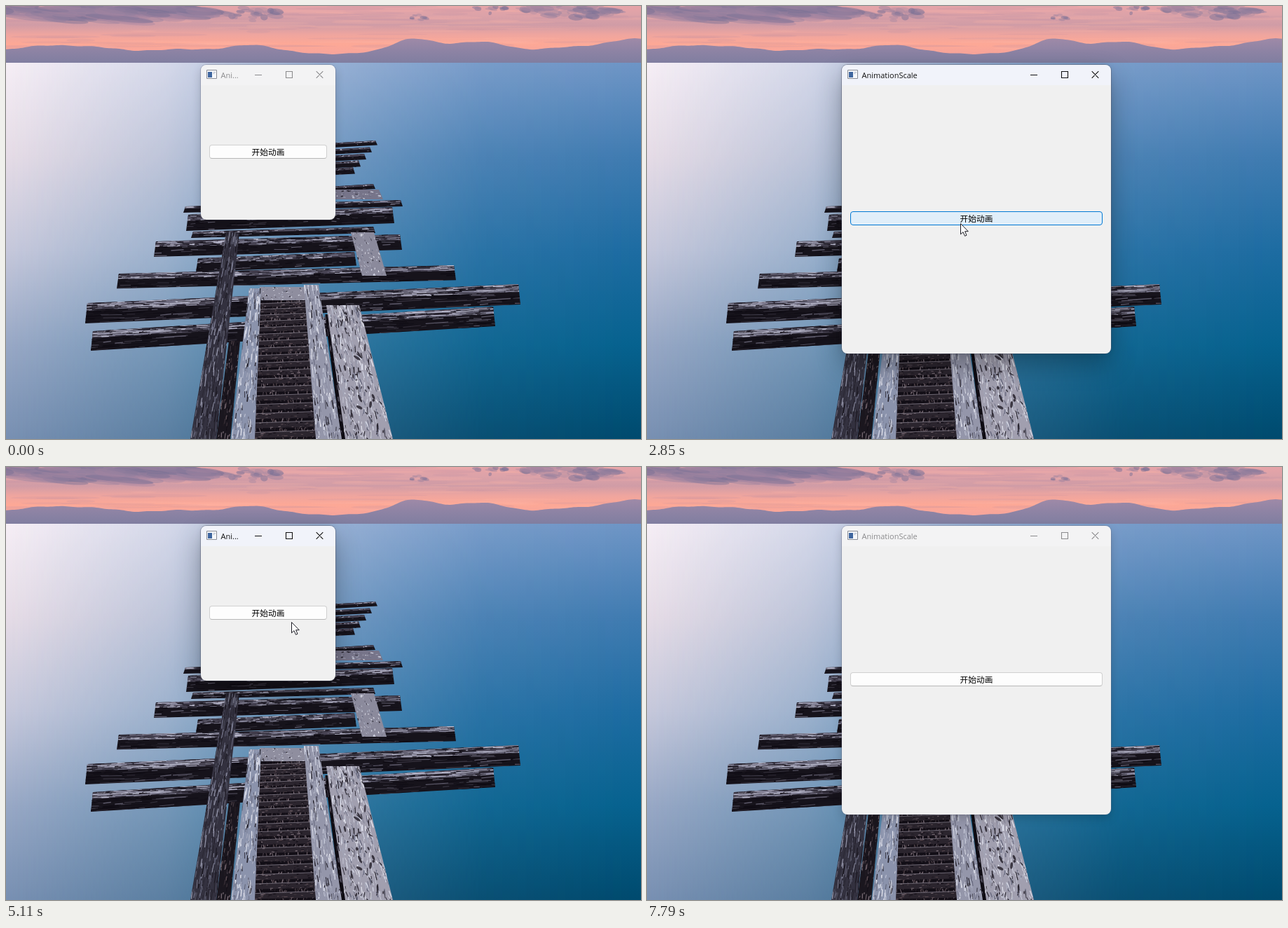
An HTML page with a canvas for the animation above (7860 ms loop, 906 by 618 pixels).

```html
<!DOCTYPE html>
<html lang="zh">
<head>
<meta charset="utf-8">
<title>AnimationScale</title>
<style>
  html, body { margin: 0; width: 100%; height: 100%; overflow: hidden; }
  body { position: relative; background: #3f78b0; }
  canvas { position: absolute; left: 0; top: 0; }
  #win {
    position: absolute; left: 278px; top: 84px; border-radius: 8px; overflow: hidden;
    background: rgba(255,255,255,.15);
    box-shadow: 0 0 0 1px rgba(90,95,115,.3), 0 5px 14px rgba(0,0,0,.18);
  }
  #win.active { box-shadow: 0 0 0 1px rgba(70,75,95,.4), 0 16px 36px rgba(0,0,0,.3), 0 0 10px rgba(0,0,0,.08); }
  #bar { position: absolute; left: 0; right: 0; top: 0; height: 29px; background: #f3f3f4; color: #8b8b8d; }
  .active #bar { background: #f1f3fa; color: #111; }
  #icon { position: absolute; left: 8px; top: 7px; }
  #title {
    position: absolute; left: 28.5px; top: 6px; white-space: nowrap;
    font: 11px/17px "Open Sans", "Noto Sans", sans-serif;
  }
  #ctl { position: absolute; right: 0; top: 0; fill: none; stroke: currentColor; stroke-width: 1.1; }
  #client { position: absolute; left: 0; top: 29px; background: #f0f0f0; }
  #btn {
    position: absolute; left: 12px; right: 12px; height: 20px; box-sizing: border-box;
    border: 1px solid #d0d0d0; border-bottom-color: #b8b8b8; border-radius: 4px; background: #fdfdfd;
    color: #000; text-align: center; white-space: nowrap;
    font: 11.7px/18px "Noto Sans CJK SC", "Noto Sans CJK", sans-serif;
  }
  #btn.hover { background: #e0eef9; border-color: #0078d4; }
  #btn.down { background: #cce4f7; border-color: #005499; }
  #cur { position: absolute; left: 0; top: 0; overflow: visible; }
</style>
</head>
<body>
<canvas id="bg" width="906" height="618"></canvas>
<div id="win">
  <div id="client"><div id="btn">开始动画</div></div>
  <div id="bar">
    <svg id="icon" width="15" height="13">
      <path d="M.5 .5h14v12H.5z" fill="#f7f8fb" stroke="#8a8d96"/>
      <path d="M2 3h6v8H2z" fill="#3f669f"/>
      <path d="M9.5 3.5h3.5M9.5 5.5h2" stroke="#a9b4c8"/>
    </svg>
    <span id="title"></span>
    <svg id="ctl" width="132" height="29">
      <path d="M17 14.5h10M61.5 9.5h9v9h-9zM104.7 9.2l9.6 9.6m0-9.6l-9.6 9.6"/>
    </svg>
  </div>
</div>
<svg id="cur" width="12" height="20">
  <path d="M.5.6V15.8L4 12.6 6.5 18.3 9 17.2 6.6 11.7H11.3Z" fill="#fff" stroke="#1c1c24" stroke-linejoin="round"/>
</svg>
<script>
const $ = id => document.getElementById(id);
const W = 906, H = 618, SHORE = 81;
const bg = $('bg').getContext('2d');
let seed = 71;
const rnd = (a = 0, b = 1) => {
  seed = (seed * 16807) % 2147483647;
  return a + (b - a) * seed / 2147483647;
};
const pick = list => list[Math.floor(rnd(0, list.length))];
const mix = (a, b, k) => a + (b - a) * k;

function shade(c, x0, y0, x1, y1, colors) {
  const gr = c.createLinearGradient(x0, y0, x1, y1);
  colors.forEach((v, i) => gr.addColorStop(i / (colors.length - 1), v));
  c.fillStyle = gr;
}
function blob(x, y, rx, ry, color, turn = 0) {
  bg.fillStyle = color;
  bg.beginPath();
  bg.ellipse(x, y, rx, ry, turn, 0, 7);
  bg.fill();
}

function cloud(x, y, w, h) {
  for (let i = 0; i < w / 3; i++) {
    const dx = rnd(-1, 1), r = 1 - dx * dx;
    blob(x + dx * w / 2, y + rnd(-.5, .5) * h * r, rnd(.05, .16) * w, rnd(.08, .2) * h,
      pick(['rgba(124,114,149,.5)', 'rgba(146,126,158,.45)', 'rgba(166,134,160,.4)']), .1);
  }
}

function sky() {
  shade(bg, 0, 0, 0, SHORE, ['#e6a4a8', '#dca2a8', '#d09ca6', '#eea59f', '#fda896', '#f7a59b', '#e9a3a2']);
  bg.fillRect(0, 0, W, SHORE + 1);
  for (let i = 0; i < 110; i++)
    blob(rnd(0, W), rnd(0, 62), rnd(15, 80), rnd(.5, 2.5),
      pick(['rgba(255,182,164,.2)', 'rgba(178,138,160,.17)']));
  cloud(130, 7, 330, 32);
  cloud(355, 12, 75, 24);
  cloud(588, 16, 34, 12);
  cloud(690, 3, 45, 16);
  cloud(805, 6, 130, 24);

  // ridge: a few broad peaks with a small ripple
  const peaks = [[80, 12, 100], [265, 6, 60], [355, 12, 45], [578, 20, 42], [672, 17, 60], [800, 7, 60], [906, 21, 70]];
  bg.beginPath();
  bg.moveTo(0, SHORE);
  for (let x = 0; x <= W; x += 3) {
    const up = peaks.reduce((s, [c, h, w]) => s + h * Math.exp(-(((x - c) / w) ** 2)), 0);
    bg.lineTo(x, 68 - up + Math.sin(x / 9) * Math.sin(x / 23));
  }
  bg.lineTo(W, SHORE);
  shade(bg, 0, 48, 0, SHORE, ['#9d89a7', '#8d83a4', '#807ea0']);
  bg.fill();
}

// the deep right side, with the pale left side fading over it
function water() {
  const layer = document.createElement('canvas');
  layer.width = W;
  layer.height = H;
  const c = layer.getContext('2d');
  shade(bg, 0, SHORE, 0, H, ['#6e95c6', '#3f7bb1', '#1d6ca2', '#06628f', '#004a6e']);
  bg.fillRect(0, SHORE, W, H);
  shade(c, 0, SHORE, 0, H, ['#f6eef5', '#e6dce6', '#c6c8db', '#98a8c5', '#7890b2']);
  c.fillRect(0, SHORE, W, H);
  c.globalCompositeOperation = 'destination-in';
  shade(c, 0, 0, W, 0, [1, .76, .32, .08, 0].map(a => `rgba(0,0,0,${a})`));
  c.fillRect(0, 0, W, H);
  bg.drawImage(layer, 0, 0);
}

// corners run start, end, far end, far start; the grain follows start to end
function plank(q, base, tones, n, top = 0) {
  const at = (u, v) => [0, 1].map(i => mix(mix(q[0][i], q[1][i], u), mix(q[3][i], q[2][i], u), v));
  const quad = pts => {
    bg.beginPath();
    pts.forEach(p => bg.lineTo(...p));
    bg.closePath();
  };
  bg.save();
  quad(q);
  bg.fillStyle = base;
  bg.fill();
  bg.clip();
  if (top) {
    quad([at(0, 0), at(1, 0), at(1, top), at(0, top)]);
    bg.fillStyle = '#474353';
    bg.fill();
  }
  for (let i = 0; i < n; i++) {
    const u = rnd(-.05, 1), lit = rnd() < top * 1.6;
    const v = lit ? rnd(0, top) : rnd();
    bg.strokeStyle = lit ? pick(['#b9b9cc', '#87869b', '#1d1923']) : pick(tones);
    bg.lineWidth = rnd(.4, 1.5);
    bg.beginPath();
    bg.moveTo(...at(u, v));
    bg.lineTo(...at(u + rnd(.01, .06), v + rnd(-.04, .04)));
    bg.stroke();
  }
  bg.restore();
}

const DARK = ['#0e0b13', '#0e0b13', '#131019', '#37333f', '#5b5868'];
const PALE = ['#d3d6e4', '#a5a9bc', '#e4e5ee', '#696b80', '#25222c'];
const BROWN = ['#57494f', '#241d24', '#776a73', '#120e16'];

// crosswise, thicker when nearer
function beam(x1, y1, x2, y2, t = 6 + (y1 - 190) * .08) {
  plank([[x1 + 3, y1], [x2 - 3, y2], [x2, y2 + t], [x1, y1 + t]], '#16131b', DARK, (x2 - x1) * t / 24, .36);
}
// lengthwise, given by its left edge and width at both ends
function rail(x1, y1, w1, x2, w2, base, tones, y2 = H) {
  plank([[x1, y1], [x2, y2], [x2 + w2, y2], [x1 + w1, y1]], base, tones, (w1 + w2) * (y2 - y1) / 42);
}

function pier() {
  for (let i = 0; i < 5; i++) beam(440, 197 + i * 9, 530 - i * 8, 192 + i * 9.5);
  beam(440, 259, 527, 254, 7);
  rail(420, 262, 112, 420, 118, '#77758a', PALE, 276);
  beam(253, 286, 566, 277, 9);
  beam(257, 298, 554, 287, 23);
  beam(264, 322, 527, 315, 9);
  beam(211, 336, 565, 326, 22);
  beam(271, 360, 500, 351);
  beam(158, 382, 642, 370);
  beam(113, 424, 734, 397, 29);
  beam(121, 464, 698, 429, 28);

  rail(492, 323, 33, 508, 35, '#8b8a9c', PALE, 385);
  rail(318, 478, 16, 300, 20, '#1a161e', BROWN);
  rail(314, 323, 19, 263, 37, '#33313f', ['#6d6e84', '#1b1821', '#50505f', '#282530', '#8d8ea2']);

  // ladder
  rail(362, 416, 66, 354, 89, '#120e16', BROWN);
  for (let y = 424, gap = 8; y < H; y += gap, gap += .35) {
    const k = (y - 416) / (H - 416);
    const l = mix(362, 355, k), r = mix(428, 442, k), h = gap * .5;
    plank([[l, y + 1], [r, y - 2], [r, y + h], [l, y + h + 2]], '#2b252e', BROWN, 26);
    bg.strokeStyle = '#8f8996';
    bg.lineWidth = .7;
    bg.beginPath();
    bg.moveTo(l, y + 1);
    bg.lineTo(r, y - 2);
    bg.stroke();
  }
  rail(362, 401, 66, 364, 63, '#8f8e9f', PALE, 420);
  rail(347, 403, 17, 321, 34, '#8b93ac', PALE);
  rail(455, 440, 7, 478, 8, '#0e0b12', DARK);
  rail(425, 398, 21, 442, 37, '#9496aa', PALE);
  rail(457, 427, 47, 484, 68, '#a19faf', PALE);
  for (let i = 0; i < 30; i++) {
    const k = rnd();
    blob(mix(482, 518, k) + rnd(-20, 20), mix(432, 612, k), rnd(1, 6), rnd(.6, 2), 'rgba(32,28,38,.8)', rnd(.4, 1.9));
  }
}

sky();
water();
pier();

const LOOP = 7860, TIME = 1000, SMALL = [192, 221], BIG = [384, 412];
const WAKE = 1330, SLEEP = 7790;
// press, release, grow (1) or shrink (0)
const clicks = [[1330, 1520, 1], [3440, 3529, 0], [5400, 5452, 1]];
// pointer moves: from, until, x, y
const moves = [
  [120, 580, 551, 451], [770, 1170, 425, 211], [1520, 1630, 433, 257], [2180, 2560, 447, 284],
  [2740, 2850, 447, 310], [3540, 3680, 451, 323], [4740, 5280, 402, 210], [6750, 7260, 775, 620]
];

const easeInOut = x => x < .5 ? 2 * x * x : 1 - 2 * (1 - x) * (1 - x);
const easeOut = x => 1 - (1 - x) * (1 - x);

function size(t) {
  let k = 0;
  for (const [, start, to] of clicks)
    if (t >= start) k = mix(1 - to, to, easeInOut(Math.min(1, (t - start) / TIME)));
  return SMALL.map((s, i) => Math.round(mix(s, BIG[i], k)));
}
const btnTop = h => Math.floor((h - 29) / 2) - 11;

// pointer place, and the moment it last moved
function pointer(t) {
  let x = 787, y = 563, last = 0;
  for (const [from, until, tx, ty] of moves) {
    if (t < from) break;
    last = Math.min(t, until);
    const k = easeOut((last - from) / (until - from));
    x = mix(x, tx, k);
    y = mix(y, ty, k);
  }
  return { x: Math.round(x), y: Math.round(y), last };
}
// the button only notices the pointer while it moves
function hovered({ x, y, last }) {
  const [w, h] = size(last), dy = y - 113 - btnTop(h);
  return x >= 290 && x < 266 + w && dy >= 0 && dy < 20;
}

const pen = document.createElement('canvas').getContext('2d');
pen.font = '11px "Open Sans", "Noto Sans", sans-serif';
function fit(text, room) {
  if (pen.measureText(text).width <= room) return text;
  let n = text.length;
  while (n > 1 && pen.measureText(text.slice(0, n) + '...').width > room) n--;
  return text.slice(0, n) + '...';
}

function box(id, w, h) {
  $(id).style.width = w + 'px';
  $(id).style.height = h + 'px';
}

function draw() {
  const t = performance.now() % LOOP;
  const [w, h] = size(t);
  // the contents trail slightly behind the frame
  let [cw, ch] = size(t - 10);
  if (w - cw < 2) [cw, ch] = [w, h];
  box('win', w, h);
  box('client', cw, ch - 29);
  $('win').className = t >= WAKE && t < SLEEP ? 'active' : '';
  $('title').textContent = fit('AnimationScale', w - 160.5);

  const p = pointer(t);
  const down = clicks.some(([a, b]) => t >= a && t < b);
  $('btn').style.top = btnTop(ch) + 'px';
  $('btn').className = down ? 'down' : hovered(p) ? 'hover' : '';
  $('cur').style.display = p.last && t < 7260 ? '' : 'none';
  $('cur').style.transform = `translate(${p.x}px,${p.y}px)`;
  requestAnimationFrame(draw);
}
draw();
</script>
</body>
</html>
```
